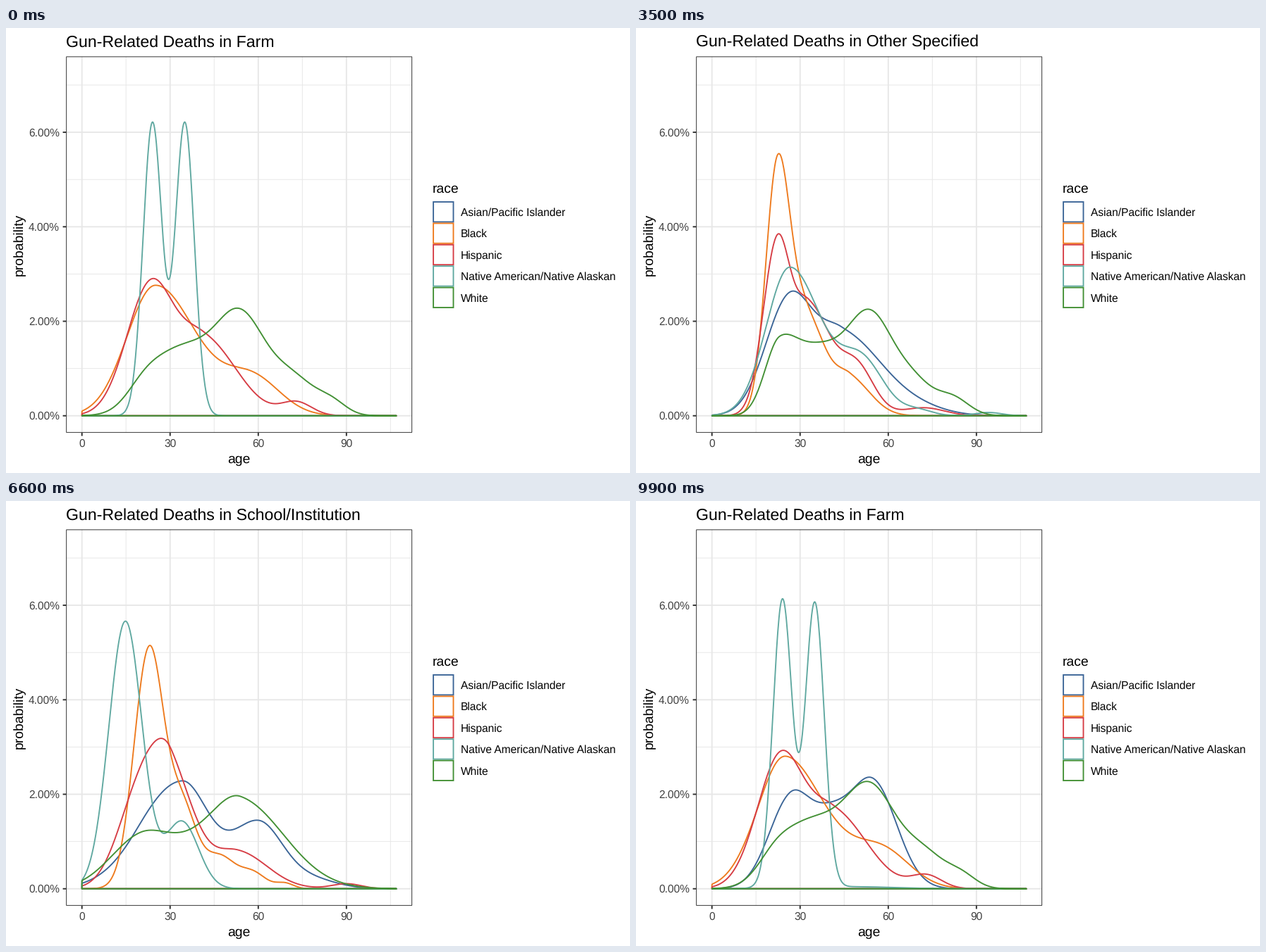
Animation of 885x632 px, one loop 10000 ms. Source, as a matplotlib script:

```python
import numpy as np
import matplotlib.pyplot as plt
from matplotlib.animation import FuncAnimation
from matplotlib.patches import Rectangle

W, H, DPI = 885, 632, 100
PT = 72 / DPI  # points per pixel
LINE = 1.88 * PT
FRAMES, PER_PLACE, HOLD = 100, 10, 5

plt.rcParams["font.family"] = "Liberation Sans"
plt.rcParams["text.hinting"] = "none"

RACES = {
    "Asian/Pacific Islander": "#3b6597",
    "Black": "#ee7a1d",
    "Hispanic": "#d63c44",
    "Native American/Native Alaskan": "#5fa8a0",
    "White": "#429034",
}
AGE = np.linspace(0, 107, 512)
LEFT, TOP, RIGHT, BOTTOM = 85.4, 40.6, 575.9, 574.6


def px(age):
    return 107.7 + 4.168 * age


def py(percent):
    return 550.7 - 67.1 * percent


def bell(centre, height, left, right=None):
    """Normal bump whose two sides may differ in width."""
    width = np.where(AGE < centre, left, right or left)
    return height * np.exp(-((AGE - centre) / width) ** 2 / 2)


def bells(*parts):
    return sum(bell(*p) for p in parts)


def typical(peak):
    """Skewed peak at a young age; a wide bell fills the area up to 100 %."""
    left, right, wide = 5, 7, 14
    rest = 100 - peak * np.sqrt(np.pi / 2) * (left + right)
    return bells((23, peak, left, right),
                 (48, rest / (np.sqrt(2 * np.pi) * wide), wide))


names, density = [], []


def place(name, *curves):
    names.append(name)
    density.append(curves)


place(
    "Farm",
    None,
    bells((25, 2.76, 9.7, 13.8), (58, .78, 9.5)),
    bells((23, 2.65, 8, 7.5), (41, 1.65, 9, 11.3), (73, .28, 5.2)),
    bells((24, 6.2, 3.22), (35, 6.2, 3.22)),
    bells((21, .38, 6), (34, 1.35, 10), (54, 2.04, 8.5), (72, .73, 7.5), (85, .25, 5)),
)
place("Home", *map(typical, (2.2, 4, 3.3, 2.7, 1.2)))
place(
    "Industrial/Construction",
    bells((22, 1.54, 8.63), (54, 3.08, 8.63)),
    bells((25.5, 2.95, 8, 6), (38, 2.55, 5, 6.5), (52, .55, 6), (65, .25, 5)),
    bells((19.5, 2.1, 7.3, 6.5), (35, 2.53, 8, 11), (58, .2, 5)),
    None,
    bells((21, .75, 5.8), (38, 1.45, 9.5), (51, 1.77, 7, 8), (68, 1.08, 8.5)),
)
place(
    "Other Specified",
    bells((26, 2.36, 8, 7.5), (44, 1.75, 9, 13.5), (70, .13, 10)),
    bells((22.3, 5.2, 4, 4.2), (32, 2.1, 5, 6.5), (47, .76, 5, 7)),
    bells((22, 3.5, 4.7, 4.3), (33, 2.3, 5.5, 7), (49, 1.05, 6), (72, .17, 7)),
    bells((26.5, 3.14, 8, 10.5), (51, 1.13, 7.5), (70, .12, 5), (94, .07, 4.5)),
    bells((23, 1.53, 5, 7), (37, 1.1, 7), (53.5, 2.15, 8), (69, .6, 6.5), (82, .36, 5.5)),
)
place("Other Unspecified", *map(typical, (2.4, 4.6, 3.7, 3, 1.6)))
place(
    "Residential Institution",
    None,
    bells((21.5, 6.42, 4.1, 5.4), (36, .6, 4.5),
          (45, 1.38, 3.2), (57.5, .56, 3.2), (70, .3, 3.2)),
    bells((1, .38, 5), (23.5, 3.57, 7.2, 12), (56, .43, 5)),
    bells((17.5, 2.34, 7.8, 12), (53, 1.82, 9, 10)),
    bells((26, 1.06, 11), (56, 1.09, 12), (81, 1.37, 11)),
)
place(
    "School/Institution",
    bells((34, 2.28, 14, 9), (60, 1.38, 9, 8), (77, .22, 9)),
    bells((22.8, 4.95, 5.1, 4.8), (34, 1.75, 5), (47, .68, 5), (58, .35, 4.5),
          (69, .12, 3)),
    bells((20, 2.12, 7.5, 7), (30.5, 2.25, 6, 8), (53, .76, 8, 10), (90, .11, 5)),
    bells((14.8, 5.66, 5.64), (34, 1.42, 5.64)),
    bells((20, 1.1, 10.5, 10), (37, .55, 9), (54, 1.85, 10, 15)),
)
place("Sports", typical(2), typical(6.6), typical(3), None, typical(1))
place(
    "Streets",
    bells((24, 4.1, 5.5, 5.8), (40, 1.45, 8, 9), (51, .35, 4), (62, .43, 5.5)),
    bells((21.7, 5.15, 3.9, 4), (31.5, 2.6, 4.8, 6), (46, .7, 6, 7)),
    bells((20.7, 4.65, 3.9, 4.4), (32, 2.3, 6, 6.5), (47, .62, 6, 8)),
    bells((22, 3.28, 6.5, 7), (33, 1.5, 5), (46, 1.45, 5.5), (60, .45, 6)),
    bells((23.5, 2.14, 5.5, 12), (51.5, 1.87, 8.5, 10), (74, .4, 8)),
)
place(
    "Trade/Service Area",
    bells((26.5, 1.83, 7.3, 6.5), (40, 1.32, 7), (55, 2.2, 7.5, 8)),
    *map(typical, (4, 3.4, 3.5, 1.5)),
)

fig = plt.figure(figsize=(W / DPI, H / DPI), dpi=DPI, facecolor="white")
ax = fig.add_axes([0, 0, 1, 1])
ax.set_xlim(0, W)
ax.set_ylim(H, 0)
ax.axis("off")


def label(x, y, text, size, color="black", ha="left", **kw):
    return ax.text(x, y, text, fontsize=size * PT, color=color, ha=ha,
                   va="baseline", **kw)


def stroke(xs, ys, color, width=LINE, z=1):
    return ax.plot(xs, ys, color=color, lw=width, zorder=z, snap=False,
                   solid_capstyle="butt", solid_joinstyle="round")[0]


def box(x, y, w, h, color, width=LINE, z=1):
    ax.add_patch(Rectangle((x, y), w, h, fill=False, ec=color, lw=width,
                           zorder=z, snap=False))


GRID, INK, TICK = "#e7e7e7", "#2c2c2c", "#404040"

for age in range(0, 106, 15):
    major = age % 30 == 0
    stroke([px(age)] * 2, [TOP, BOTTOM], GRID, LINE if major else LINE / 2)
    if major:
        stroke([px(age)] * 2, [BOTTOM, BOTTOM + 4.8], INK)
        label(px(age), 595, str(age), 15.5, TICK, "center")
for pct in range(8):
    major = pct % 2 == 0
    stroke([LEFT, RIGHT], [py(pct)] * 2, GRID, LINE if major else LINE / 2)
    if major:
        stroke([LEFT - 4.8, LEFT], [py(pct)] * 2, INK)
        label(76, py(pct) + 5.6, f"{pct:.2f}%", 15.5, TICK, "right")

box(LEFT + .25, TOP + .25, RIGHT - LEFT - .5, BOTTOM - TOP - .5, INK, LINE / 2, 5)
label(330.6, 618, "age", 19.36, ha="center")
label(23.8, 307.6, "probability", 19.36, ha="center", rotation=90,
      rotation_mode="anchor")
title = label(85.2, 26.4, "", 23.15)

label(604.8, 234.2, "race", 19.36)
for row, (race, color) in enumerate(RACES.items()):
    mid = 261.2 + 30.4 * row
    box(606.1, mid - 14.2, 28.4, 28.4, color)
    label(645, mid + 5.6, race, 15.5)

outline_x = np.concatenate([px(AGE), px(AGE[[-1, 0, 0]])])
lines = [stroke([], [], color, z=3) for color in RACES.values()]


def ease(u):
    """Cubic in and out."""
    return 4 * u ** 3 if u < .5 else 1 - 4 * (1 - u) ** 3


def draw(frame):
    here, step = divmod(frame, PER_PLACE)
    there = (here + 1) % len(names)
    u = max(0, (step - HOLD) / (PER_PLACE - HOLD))
    t = ease(u)
    title.set_text("Gun-Related Deaths in " + names[there if u > .5 else here])
    for line, a, b in zip(lines, density[here], density[there]):
        # a group missing on either side does not blend
        line.set_visible(a is not None)
        if a is None:
            continue
        y = a if b is None else (1 - t) * a + t * b
        line.set_data(outline_x, py(np.concatenate([y, [0, 0, y[0]]])))
    return [title, *lines]


anim = FuncAnimation(fig, draw, frames=FRAMES, interval=100, repeat=True,
                     repeat_delay=0, blit=False)
plt.show()
```
